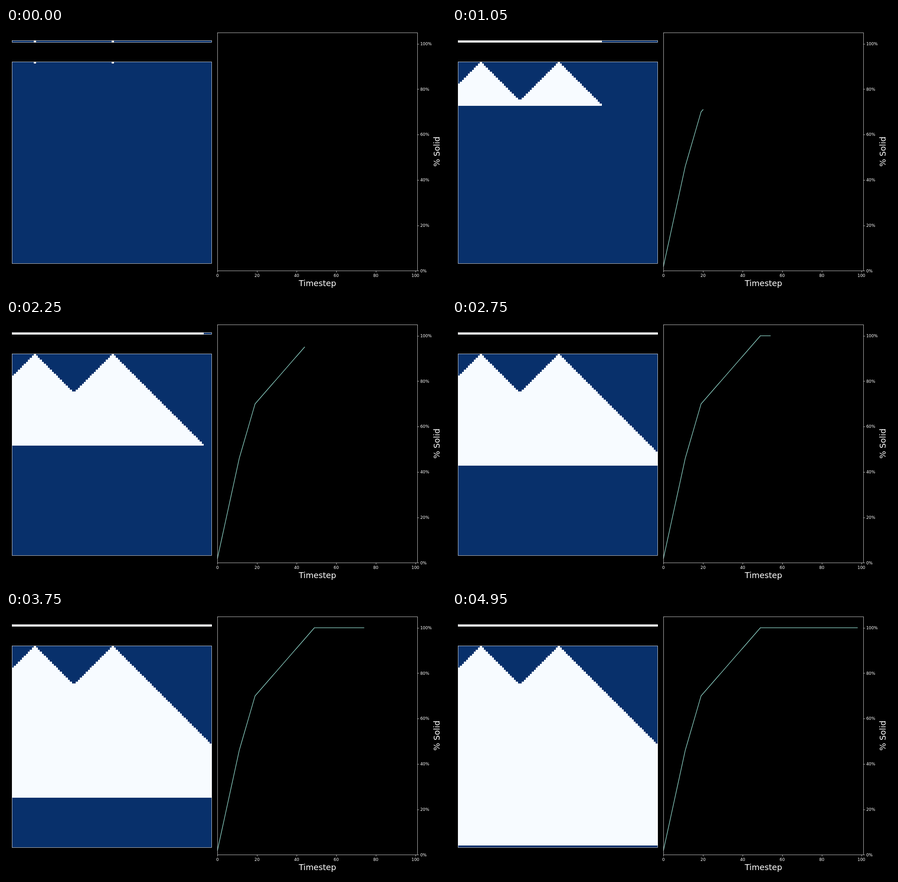
Write an HTML page with a canvas that moves like this. It is 966 px wide and 580 px high and loops after 5 s.

```html
<!DOCTYPE html>
<html lang="en">
<head>
<meta charset="utf-8">
<title>Solid fraction</title>
<style>
html, body { margin: 0; width: 100%; height: 100%; overflow: hidden; background: #000; }
canvas { display: block; }
</style>
</head>
<body>
<canvas id="stage" width="966" height="580"></canvas>
<script>
const ctx = document.getElementById('stage').getContext('2d');
const STEP_MS = 50, STEPS = 100, COLS = 100, CELL = 4.387;
const SEEDS = [11, 50];
const LIQUID = '#08306b', SOLID = '#f7fbff', CURVE = '#8dd3c7';
const GRID = { left: 13, top: 74.1, right: 452, bottom: 517 };
const PLOT = { left: 464.3, top: 9.6, right: 903.1, bottom: 533.4 };
const FONT = '"DejaVu Sans", sans-serif';

const cellX = col => Math.round(GRID.left + col * CELL);
const rowY = row => Math.round(GRID.top + row * CELL);
const plotX = step => PLOT.left + step * (PLOT.right - PLOT.left) / 101;
const plotY = pct => PLOT.bottom - pct * (PLOT.bottom - PLOT.top) / 105;
const crisp = v => Math.round(v) + 0.5;

// Each seed spreads one cell per step to both sides; touching spans merge.
function solidSpans(row) {
  const spans = SEEDS.map(s => [Math.max(0, s - row), Math.min(COLS, s + row + 1)]);
  const [a, b] = spans;
  return a[1] >= b[0] ? [[a[0], b[1]]] : spans;
}

const solidPercent = row => solidSpans(row).reduce((sum, [a, b]) => sum + b - a, 0);

function fillBox(color, x0, y0, x1, y1) {
  ctx.fillStyle = color;
  ctx.fillRect(x0, y0, x1 - x0, y1 - y0);
}

function fillSolid(row, y0, y1) {
  for (const [a, b] of solidSpans(row)) fillBox(SOLID, cellX(a), y0, cellX(b), y1);
}

function thinStroke() {
  ctx.strokeStyle = '#fff';
  ctx.lineWidth = 0.71;
  ctx.lineCap = 'butt';
  ctx.lineJoin = 'miter';
}

function frameBox(x0, y0, x1, y1) {
  thinStroke();
  ctx.strokeRect(x0 + 0.5, y0 + 0.5, x1 - x0, y1 - y0);
}

function tick(x, y, dx, dy) {
  thinStroke();
  ctx.beginPath();
  ctx.moveTo(x, y);
  ctx.lineTo(x + dx, y + dy);
  ctx.stroke();
}

function label(text, x, y, size, align) {
  ctx.font = size + 'px ' + FONT;
  ctx.textAlign = align;
  ctx.fillStyle = '#fff';
  ctx.fillText(text, x, y);
}

function drawCells(step) {
  fillBox(LIQUID, GRID.left, 28, GRID.right, 32);
  fillSolid(step, 28, 32);
  frameBox(13, 27, 451, 31);

  fillBox(LIQUID, GRID.left, rowY(0), GRID.right, GRID.bottom);
  for (let row = 0; row <= step; row++) fillSolid(row, rowY(row), rowY(row + 1));
  frameBox(13, 74, 451, 517);
}

function drawCurve(last) {
  if (last < 1) return;
  ctx.strokeStyle = CURVE;
  ctx.lineWidth = 1.33;
  ctx.lineCap = 'square';
  ctx.lineJoin = 'round';
  ctx.beginPath();
  for (let i = 0; i <= last; i++) ctx.lineTo(plotX(i), plotY(solidPercent(i)));
  ctx.stroke();
}

function drawAxes() {
  frameBox(464, 10, 903, 533);
  for (let v = 0; v <= 100; v += 20) {
    const x = crisp(plotX(v)), y = crisp(plotY(v));
    tick(x, 533.5, 0, 3.6);
    label(String(v), plotX(v), 547, 8.89, 'center');
    tick(903.5, y, 3.1, 0);
    label(v + '%', 909.4, Math.round(plotY(v) + 3.3), 8.89, 'left');
  }
  label('Timestep', 683.7, 566.5, 17.78, 'center');
  ctx.save();
  ctx.translate(952, 271.5);
  ctx.rotate(-Math.PI / 2);
  label('% Solid', 0, 0, 17.78, 'center');
  ctx.restore();
}

function draw() {
  const step = Math.floor(performance.now() / STEP_MS) % STEPS;
  fillBox('#000', 0, 0, 966, 580);
  drawCells(step);
  drawCurve(step - 1);
  drawAxes();
  requestAnimationFrame(draw);
}

draw();
</script>
</body>
</html>
```
